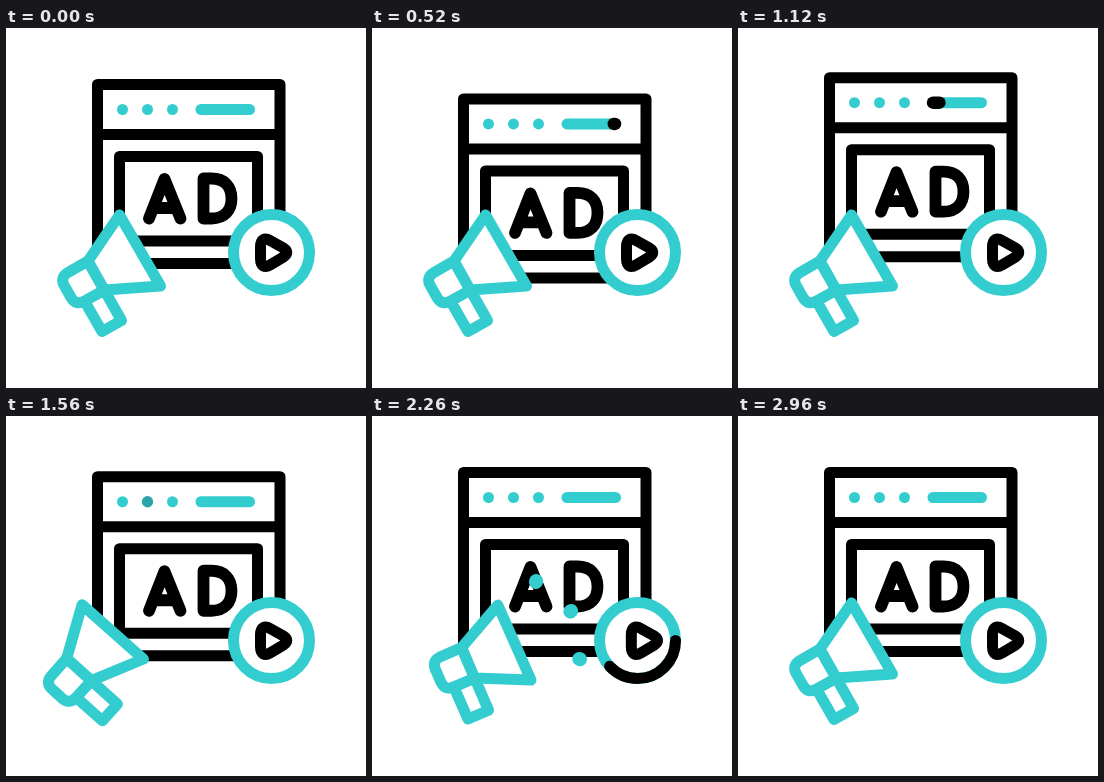
Animation, 360 px wide and 360 px high, one loop 3260 ms. Source, as an HTML page:

```html
<!DOCTYPE html>
<html lang="en">
<head>
<meta charset="utf-8">
<title>Ad campaign icon</title>
<style>
  html, body { margin: 0; height: 100%; overflow: hidden; background: #fff; }
  svg { display: block; width: 100vw; height: 100vh; }
  g { fill: none; stroke: #000; stroke-width: 11; stroke-linecap: round; stroke-linejoin: round; }
  .teal { stroke: #34cdcf; }
  .solid { fill: #fff; }
  .dots { fill: #34cdcf; stroke: none; }
  .ray { stroke-width: 14; }
</style>
</head>
<body>
<svg viewBox="0 0 360 360">
  <g id="browser">
    <path class="solid" d="M91.5 56.5h182.5v179h-182.5zM91.5 106.5h182.5M113.5 128.5h138v84.5h-138z"/>
    <path aria-label="AD" stroke-width="11.8" d="M143 190.5L158.5 151L174.5 190.5M148 180h22M197.500 150.5h8c13 0 20 8 20 20s-7 20-20 20h-8z"/>
    <g class="dots">
      <circle cx="166.5" cy="81.5" r="5.5"/>
      <circle cx="141.5" cy="81.5" r="5.5"/>
      <circle cx="116.5" cy="81.5" r="5.5"/>
    </g>
    <path class="teal" d="M243.5 81.5H195"/>
    <path id="bar" pathLength="1" stroke-width="12.5" d="M243 81.5H195"/>
  </g>
  <g id="horn" class="teal">
    <path class="ray" pathLength="1" d="M144.5 190L149 159"/>
    <path class="ray" pathLength="1" d="M159.5 204L187 185"/>
    <path class="ray" pathLength="1" d="M171 225.5L201 232"/>
    <path class="solid" d="M78.5 273L96 303.5L115.5 292.5L98.3 262z"/>
    <path class="solid" d="M82 233L62 244.5Q53.5 249.5 58.5 258L65 269.5Q70 278 78.5 273L98.3 262z"/>
    <path class="solid" d="M113.5 187L154.5 258L98.3 262L82 233z"/>
  </g>
  <g>
    <circle class="teal solid" cx="265.5" cy="224.5" r="38"/>
    <circle id="ring" cx="265.5" cy="224.5" r="38" pathLength="1"/>
    <path id="play" d="M254.5 219C254.5 211 259 209.5 264 212.5L277.5 220Q284 224.5 277.5 229L264 237C259 240 254.5 238.500 254.5 230.5z"/>
  </g>
</svg>
<script>
const LOOP = 3260;
const $ = id => document.getElementById(id);
const rays = document.querySelectorAll('.ray');
const dots = document.querySelectorAll('.dots circle');
const clamp = x => Math.min(1, Math.max(0, x));
const ramp = (t, from, to) => clamp((t - from) / (to - from));

// Sine-eased interpolation through [time, value] keys.
function swing(t, keys) {
  let value = keys[0][1];
  for (let i = 1; i < keys.length; i++) {
    const p = ramp(t, keys[i - 1][0], keys[i][0]);
    value += (keys[i][1] - keys[i - 1][1]) * (1 - Math.cos(Math.PI * p)) / 2;
  }
  return value;
}

// Shows only the stretch of a path between two fractions.
function trim(el, tail, head) {
  el.style.visibility = head > 0 && tail < 1 ? 'visible' : 'hidden';
  el.style.strokeDasharray = Math.max(.001, head - tail) + ' 9';
  el.style.strokeDashoffset = -Math.min(tail, .998);
}

function draw(now) {
  const t = now % LOOP;
  const y = swing(t, [[0, 0], [480, 15], [920, -12.5], [1440, 5], [1920, 0]]);
  const turn = swing(t, [[1160, 0], [1630, -19.5], [2200, 6.5], [2620, 0]]);
  const x = swing(t, [[2120, 0], [2320, 6], [2540, -5], [2740, 2.5], [2900, 0]]);
  $('browser').setAttribute('transform', `translate(0 ${y})`);
  $('horn').setAttribute('transform', `rotate(${turn} 100 303)`);
  $('play').setAttribute('transform', `translate(${x} 0)`);

  trim($('bar'), ramp(t, 740, 1180), ramp(t, 510, 950));
  trim($('ring'), ramp(t, 2480, 2880), ramp(t, 2120, 2490));
  rays.forEach(ray => trim(ray, ramp(t, 1970, 2270), ramp(t, 1840, 2035)));

  dots.forEach((dot, i) => {
    const k = clamp(1.5 * (1 - Math.abs(t - 1350 - i * 328) / 135));
    dot.style.fill = `rgb(${[52, 205, 207].map(c => c * (1 - k))})`;
    dot.setAttribute('r', 5.5 + k * .8);
  });
}

const start = performance.now();
(function tick() {
  draw(performance.now() - start);
  requestAnimationFrame(tick);
})();
</script>
</body>
</html>
```
